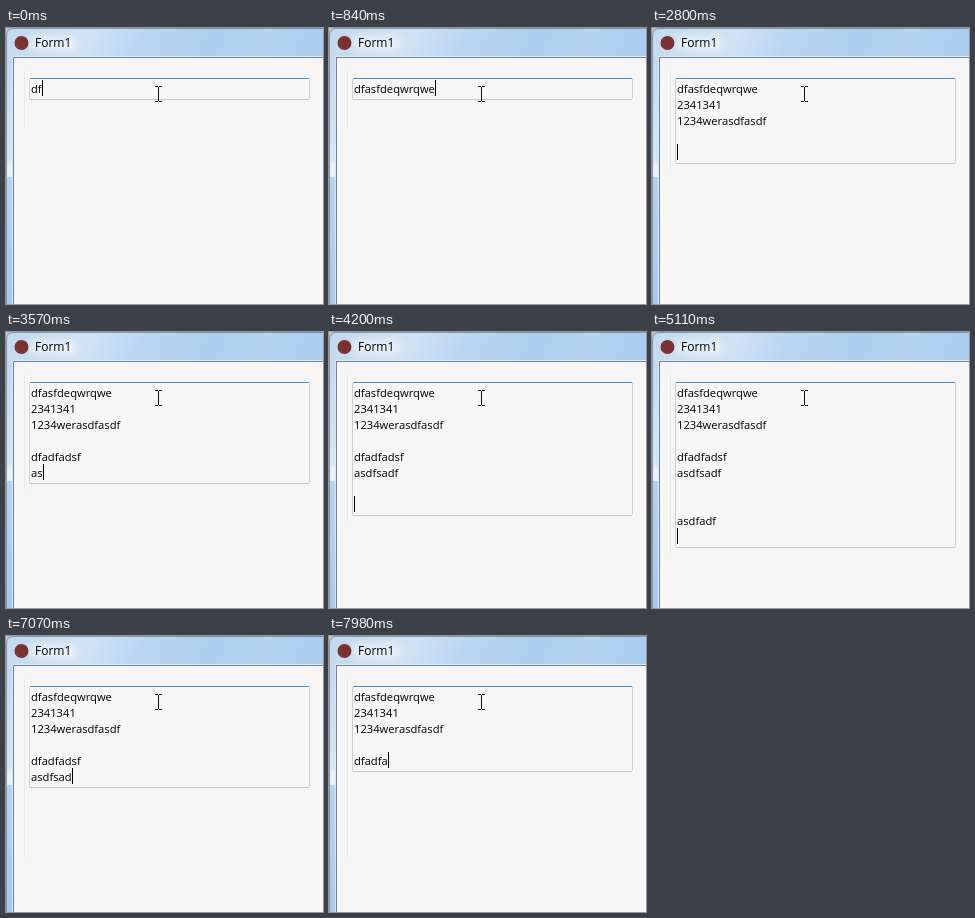
Recreate the animation shown at these times as an HTML page with a canvas. Size 317 by 276 pixels, loop 8 s.

```html
<!DOCTYPE html>
<html lang="en">
<head>
<meta charset="utf-8">
<title>Growing memo</title>
<style>
  html, body { margin: 0; width: 100%; height: 100%; overflow: hidden; background: #f6f6f6; }
  canvas { position: absolute; left: 0; top: 0; }
  div {
    position: absolute;
    font: 11.2px/16px "Open Sans", "Noto Sans", sans-serif;
    color: #000;
    white-space: pre;
  }
  #title { left: 29px; top: 7px; font-size: 12px; }
  #memo { left: 25px; top: 53px; }
</style>
</head>
<body>
<canvas id="stage" width="317" height="276"></canvas>
<div id="title">Form1</div>
<div id="memo"></div>
<script>
const W = 317, H = 276, LOOP = 8000, TICK = 70, LINE = 16;
const ctx = document.getElementById("stage").getContext("2d");
const memo = document.getElementById("memo");

// One token per tick: "-" idle, "/" Enter, "<" Backspace, anything else is typed.
const keys = `
  df a s f - de qw - r qw e - - / - -
  2 3 41 - 3 41 - / 123 4we ras - - d - f a s df - / - - -
  / d fa d fa ds - f - / - as df - s adf - - / - / - - -
  / - as d - fa d f - / - - - -
  < - < - < - < - < - < - < - -
  < - < - < - < - < - < - < - - - - -
  << <<< << <<`.trim().split(/\s+/);

let typed = "", tallest = 1;
const states = keys.map(token => {
  for (const key of token) {
    if (key === "<") typed = typed.slice(0, -1);
    else if (key === "/") typed += "\n";
    else if (key !== "-") typed += key;
  }
  const lines = typed.split("\n");
  tallest = Math.max(tallest, lines.length);
  return { text: typed, lines, tallest };
});

function rect(color, x, y, w, h) {
  ctx.fillStyle = color;
  ctx.fillRect(x, y, w, h);
}

function gradient(x0, y0, x1, y1, stops) {
  const g = ctx.createLinearGradient(x0, y0, x1, y1);
  for (const [at, color] of stops) g.addColorStop(at, color);
  return g;
}

function drawWindow() {
  // slanted glass reflections
  rect(gradient(0, 0, W - 40, 110, [
    [0, "#c3d9ef"], [0.27, "#d0e3f5"], [0.44, "#b9d5f1"],
    [0.66, "#aecdee"], [0.82, "#b5d3f1"], [1, "#a9ccf0"]
  ]), 0, 0, W, 29);
  rect(gradient(0, 29, 0, 149, [
    [0, "#c3d9ef"], [0.86, "#d6e5f4"], [0.9, "#eaf2f9"], [1, "#eaf2f9"]
  ]), 0, 29, 8, 120);
  rect(gradient(0, 149, 0, H, [[0, "#b7d2ee"], [1, "#a9c9e9"]]), 0, 149, 8, H - 149);

  // soft glow behind the caption
  ctx.save();
  ctx.filter = "blur(4px)";
  rect("rgba(255,255,255,.6)", 24, 9, 46, 13);
  ctx.restore();

  // rounded outer corner
  ctx.beginPath();
  ctx.moveTo(0, 7);
  ctx.quadraticCurveTo(1, 1, 7, 0);
  ctx.lineTo(0, 0);
  ctx.fillStyle = "#c9c4c0";
  ctx.fill();
  ctx.beginPath();
  ctx.moveTo(0.5, H);
  ctx.lineTo(0.5, 7);
  ctx.quadraticCurveTo(1, 1, 7, 0.5);
  ctx.lineTo(W, 0.5);
  ctx.strokeStyle = "#7f93a8";
  ctx.stroke();

  ctx.beginPath();
  ctx.arc(15.5, 15, 7, 0, Math.PI * 2);
  ctx.fillStyle = "#7c3032";
  ctx.fill();

  // light bevel, dark edge, client area
  rect("#d9e8f6", 6, 28, W - 6, H - 28);
  rect("#6a849e", 7, 29, W - 7, H - 29);
  rect("#f6f6f6", 8, 30, W - 8, H - 30);
}

function drawMemo({ lines, tallest }) {
  const top = 50, bottom = 56 + LINE * lines.length;
  const panelEnd = Math.max(100, 61 + LINE * tallest);
  rect("#dfe8ef", 18, 43, 1, panelEnd - 43);

  rect("#c3d0db", 23, top + 1, 1, bottom - top - 2);
  rect("#c3d0db", 303, top + 1, 1, bottom - top - 2);
  rect("#bcc5cc", 24, bottom - 1, 279, 1);
  rect("#478fc6", 24, top, 279, 1);

  const last = lines.length - 1;
  ctx.font = getComputedStyle(memo).font;
  const caret = 25 + Math.round(ctx.measureText(lines[last]).width);
  rect("#000", caret, 52 + LINE * last, 1, LINE);
}

function drawPointer() {
  rect("#111", 152, 59, 1, 14);
  for (const y of [58, 73]) {
    rect("#111", 149, y, 3, 1);
    rect("#111", 153, y, 3, 1);
  }
}

let shown = -1;
function frame(now) {
  const tick = Math.min(Math.floor(now % LOOP / TICK), states.length - 1);
  if (tick !== shown) {
    shown = tick;
    ctx.clearRect(0, 0, W, H);
    drawWindow();
    drawMemo(states[tick]);
    drawPointer();
    memo.textContent = states[tick].text;
  }
  requestAnimationFrame(frame);
}
frame(0);
</script>
</body>
</html>
```
